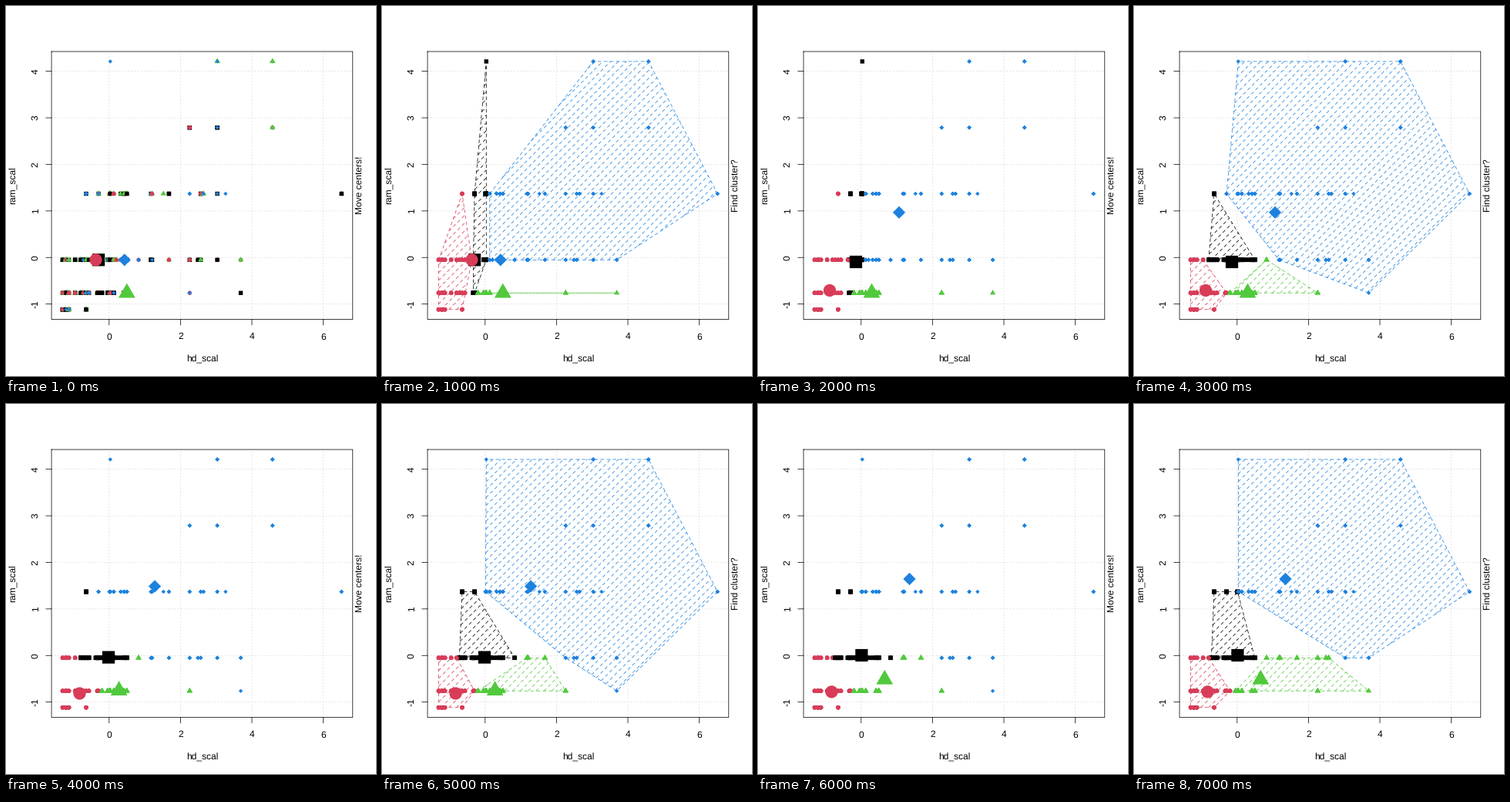
Write a matplotlib script that moves like this. It is 480 px wide and 480 px high and loops after 8000 ms.

```python
import random

import matplotlib.pyplot as plt
import numpy as np
from matplotlib.animation import FuncAnimation
from matplotlib.collections import LineCollection, PolyCollection

SIZE, DPI = 480, 80
PT = 72 / DPI                                   # points per pixel
THIN = 0.75
LEFT, RIGHT, TOP, BOTTOM = 59.04, 449.76, 59.04, 406.56
COLORS = ["#000000", "#d83c58", "#51c93c", "#1d82df"]
UNIT = np.array([46.3, 60.4])                   # pixels per scaled unit
ORIGIN = np.array([133.8, 326.25])
plt.rcParams["text.hinting"] = "none"
random.seed(4)

# disk sizes seen at each memory size
COMMON = [80, 100, 107, 125, 170, 210, 230, 250, 270, 331, 340, 365,
          405, 420, 425, 450, 525, 545]
LARGE = [720, 728, 850, 1000, 1080, 1200]
ROWS = {
    2: COMMON[:4] + [250],
    4: COMMON + [1000, 1370],
    8: COMMON + [320, 470, 500, 630, 1060, 1370] + LARGE,
    16: [250, 340, 500] + COMMON[13:] + LARGE + [810, 1100, 1260, 2100],
    24: [1000, 1200, 1600],
    32: [425, 1200, 1600],
}
# spots holding one point, with its opening label
LONE = {(425, 32): 3, (810, 16): 2, (1260, 16): 3, (1370, 4): 0}


def place(disk, ram):
    return (73.51 + (disk - 80) * 361.78 / 2020,
            393.69 - (ram - 2) * 321.78 / 30)


def sample_data():
    """Many machines share a spot; each starts with a random label."""
    points, labels = [], []
    for ram, disks in ROWS.items():
        for disk in disks:
            if (disk, ram) in LONE:
                mix = [LONE[disk, ram]]
            else:
                mix = random.choices(range(4), k=6 if disk in COMMON else 3)
            labels += mix
            points += [place(disk, ram)] * len(mix)
    return np.array(points), labels


POINTS, LABELS = sample_data()

CENTERS = [np.array(c) for c in (
    [place(340, 8), place(320, 8), place(545, 4), place(528, 8)],
    [(127, 332), (93, 369), (147.5, 372.2), (183, 267.8)],
    [(133, 328.6), (95.5, 375.5), (146.6, 371.8), (193, 236.5)],
    [(134.4, 326), (95.5, 373.4), (164.3, 357.4), (196.5, 227)],
)]


def marker(kind, pos, cex=1):
    r = 2.7 * cex
    if kind == 0:
        shape = [(-r, -r), (r, -r), (r, r), (-r, r)]
    elif kind == 1:
        a = np.linspace(0, 2 * np.pi, 48, endpoint=False)
        shape = np.column_stack([r * np.cos(a), r * np.sin(a)])
    elif kind == 2:
        shape = [(0, -1.555 * r), (1.347 * r, 0.7776 * r),
                 (-1.347 * r, 0.7776 * r)]
    else:
        shape = [(-r, 0), (0, -r), (r, 0), (0, r)]
    return np.array(shape) + pos


def nearest(centers):
    gap = (POINTS[:, None] - centers[None]) / UNIT
    return (gap ** 2).sum(axis=2).argmin(axis=1)


def hull(points):
    pts = sorted({tuple(p) for p in points})

    def half(seq):
        out = []
        for p in seq:
            while len(out) > 1:
                (ax, ay), (bx, by) = out[-2:]
                if (bx - ax) * (p[1] - ay) - (by - ay) * (p[0] - ax) > 1e-6:
                    break
                out.pop()
            out.append(p)
        return out[:-1]

    return np.array(half(pts) + half(pts[::-1]))


def hatch(poly):
    """45 degree lines, ten per inch, cut to a convex outline."""
    step = 7.2 * np.sqrt(2)
    total = poly.sum(axis=1) - ORIGIN.sum()
    lines = []
    for k in range(int(np.ceil(total.min() / step)),
                   int(total.max() // step) + 1):
        side = total - k * step
        cuts = []
        for i in range(len(poly)):
            a, b = side[i - 1], side[i]
            if (a <= 0) != (b <= 0):
                cuts.append(poly[i - 1] + (poly[i] - poly[i - 1]) * a / (a - b))
        if len(cuts) == 2:
            lines.append(sorted(map(tuple, cuts)))
    return lines


fig = plt.figure(figsize=(SIZE / DPI, SIZE / DPI), dpi=DPI, facecolor="white")
ax = fig.add_axes([0, 0, 1, 1])
ax.set_xlim(0, SIZE)
ax.set_ylim(SIZE, 0)
ax.axis("off")


def line(xs, ys, color="black", **kw):
    ax.plot(xs, ys, color=color, lw=THIN * PT, snap=False, **kw)


def label(x, y, text, angle=0):
    return ax.text(x, y, text, family="Liberation Sans", fontsize=12 * PT,
                   rotation=angle, rotation_mode="anchor",
                   ha="center", va="baseline")


def markers(items, cex, z):
    polys = PolyCollection([marker(k, p, cex) for k, p in items],
                           facecolors=[COLORS[k] for k, _ in items],
                           linewidths=0, zorder=z, snap=False)
    return ax.add_collection(polys)


def region(points, color, z):
    poly = hull(points)
    lines = hatch(poly) if len(poly) > 2 else []
    lines.append(np.vstack([poly, poly[:1]]))
    dashes = LineCollection(lines, colors=color, linewidths=THIN * PT,
                            linestyles=[(0, (4 / THIN, 4 / THIN))],
                            capstyle="round", zorder=z, snap=False)
    return ax.add_collection(dashes)


def draw_frame():
    dots = dict(color="#d3d3d3", zorder=1, dash_capstyle="round",
                linestyle=(0, (1 / THIN, 3 / THIN)))
    for v in (0, 2, 4, 6):
        x = ORIGIN[0] + v * UNIT[0]
        line([x, x], [BOTTOM, TOP], **dots)
        line([x, x], [BOTTOM, BOTTOM + 7.2])
        label(x, 432.5, str(v))
    for v in range(-1, 5):
        y = ORIGIN[1] - v * UNIT[1]
        line([LEFT, RIGHT], [y, y], **dots)
        line([LEFT - 7.2, LEFT], [y, y])
        label(41.8, y, str(v), 90)
    line([LEFT, RIGHT, RIGHT, LEFT, LEFT], [TOP, TOP, BOTTOM, BOTTOM, TOP],
         zorder=20)
    label((LEFT + RIGHT) / 2, 461.3, "hd_scal")
    label(13, (TOP + BOTTOM) / 2, "ram_scal", 90)


def hint(text):
    return label(462, (TOP + BOTTOM) / 2, text, 90)


def build_scenes():
    scenes = []
    labels = LABELS
    for centers in CENTERS:
        big = list(enumerate(centers))
        scenes.append([hint("Move centers!"),
                       markers(list(zip(labels, POINTS)), 1, 3),
                       markers(big, 3, 15)])
        labels = nearest(centers)
        scene = [hint("Find cluster?"), markers(big, 3, 15)]
        for k in range(4):
            group = POINTS[labels == k]
            scene.append(region(group, COLORS[k], 3 + 2 * k))
            scene.append(markers([(k, p) for p in group], 1, 4 + 2 * k))
        scenes.append(scene)
    return scenes


draw_frame()
scenes = build_scenes()


def update(n):
    for i, scene in enumerate(scenes):
        for artist in scene:
            artist.set_visible(i == n)
    return []


anim = FuncAnimation(fig, update, frames=len(scenes), interval=1000,
                     repeat=True, repeat_delay=0, blit=False)
plt.show()
```
